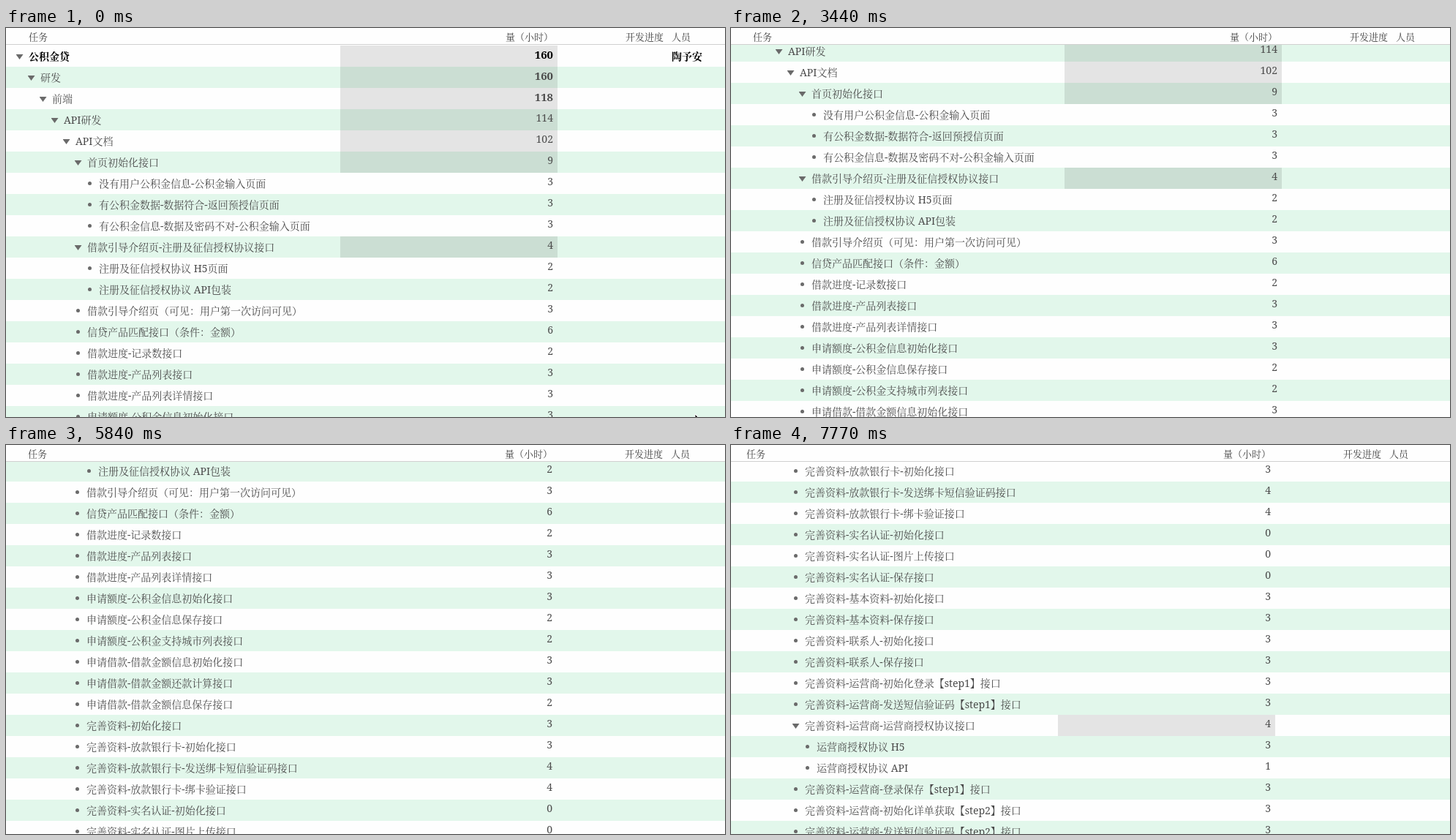
Write an HTML page that moves like this. It is 983 px wide and 532 px high and loops after 8000 ms.

```html
<!DOCTYPE html>
<html lang="zh-CN">
<head>
<meta charset="utf-8">
<title>任务列表</title>
<style>
html, body { margin: 0; width: 100%; height: 100%; overflow: hidden; background: #fefefe; }
body {
  position: relative;
  font: 14px "Noto Serif", "Noto Serif CJK SC", "Noto Sans CJK SC", "Noto Sans CJK", serif;
  color: #4a4a4a;
  white-space: nowrap;
}
.view { position: absolute; left: 0; right: 0; overflow: hidden; }
#head { top: 0; height: 22px; border-bottom: 1px solid #d0d0d0; font-size: 13px; line-height: 24px; color: #404040; }
#body { top: 23px; bottom: 0; }
.pan { position: absolute; inset: 0 -20px 0 0; animation: pan 8s step-end infinite; }
.pan span { position: absolute; top: 0; }
#list { position: absolute; top: 1px; left: 0; right: 0; animation: scroll 8s step-end infinite; }
.row { position: relative; height: 29px; line-height: 29px; }
.row:nth-child(even) { background: #e2f7eb; }
.row .hours { left: 457px; width: 291px; height: 29px; padding-right: 6px; line-height: 24px; text-align: right; }
.group .hours { background: rgba(0, 0, 0, .1); }
.row:nth-child(-n+3) .hours { font-size: 15px; font-weight: bold; }
.row:first-child { color: #000; font-weight: bold; }
.mark { position: absolute; top: 12px; width: 5.4px; height: 5.4px; margin-left: -2.7px; border-radius: 50%; background: #6a6a6a; }
.group .mark { width: 10px; height: 7px; margin-left: -5px; border-radius: 0; clip-path: polygon(0 0, 100% 0, 50% 100%); }
#pointer { position: absolute; left: 0; top: 0; animation: point 8s step-end infinite; }

/* Every swipe advances in equal jumps between its knots. */
@keyframes scroll {
  0% { transform: translateY(0); }
  35.5% { transform: translateY(-11px); animation-timing-function: steps(3); }
  41.125% { transform: translateY(-86px); animation-timing-function: steps(3); }
  46.75% { transform: translateY(-110px); animation-timing-function: steps(2); }
  50.5% { transform: translateY(-114px); }
  54.25% { transform: translateY(-123px); animation-timing-function: steps(2); }
  58% { transform: translateY(-163px); animation-timing-function: steps(4); }
  65.5% { transform: translateY(-223px); }
  67.375% { transform: translateY(-229px); animation-timing-function: steps(3); }
  73% { transform: translateY(-322px); }
  74.75% { transform: translateY(-349px); animation-timing-function: steps(6); }
  86% { transform: translateY(-547px); }
  87.75% { transform: translateY(-579px); animation-timing-function: steps(5); }
  97.125%, 100% { transform: translateY(-699px); }
}
@keyframes pan {
  0%, 50.5%, 80.375% { transform: translateX(0); }
  39.25%, 67.375% { transform: translateX(-1px); }
  91.5% { transform: translateX(-4px); }
  93.375% { transform: translateX(-8px); }
  95.25%, 100% { transform: translateX(-10px); }
}
@keyframes point {
  0% { transform: translate(941px, 527px); visibility: visible; }
  18.75% { transform: translate(967px, 496px); visibility: visible; }
  20.5%, 100% { transform: translate(967px, 496px); visibility: hidden; }
}
</style>
</head>
<body>
<div id="head" class="view"><div class="pan">
  <span style="left:31px">任务</span>
  <span style="left:683px">量（小时）</span>
  <span style="left:847px">开发进度</span>
  <span style="left:910px">人员</span>
</div></div>
<div id="body" class="view"><div class="pan"><div id="list"></div></div></div>
<svg id="pointer" width="13" height="19"><path d="M1 1V15.5L4.3 12.4L6.6 17.8L9 16.8L6.7 11.5H11.2Z" fill="#000" stroke="#fff"/></svg>
<script>
// Each line: depth, task, hours.
const tasks = `0公积金贷 160
1研发 160
2前端 118
3API研发 114
4API文档 102
5首页初始化接口 9
6没有用户公积金信息-公积金输入页面 3
6有公积金数据-数据符合-返回预授信页面 3
6有公积金信息-数据及密码不对-公积金输入页面 3
5借款引导介绍页-注册及征信授权协议接口 4
6注册及征信授权协议 H5页面 2
6注册及征信授权协议 API包装 2
5借款引导介绍页（可见：用户第一次访问可见） 3
5信贷产品匹配接口（条件：金额） 6
5借款进度-记录数接口 2
5借款进度-产品列表接口 3
5借款进度-产品列表详情接口 3
5申请额度-公积金信息初始化接口 3
5申请额度-公积金信息保存接口 2
5申请额度-公积金支持城市列表接口 2
5申请借款-借款金额信息初始化接口 3
5申请借款-借款金额还款计算接口 3
5申请借款-借款金额信息保存接口 2
5完善资料-初始化接口 3
5完善资料-放款银行卡-初始化接口 3
5完善资料-放款银行卡-发送绑卡短信验证码接口 4
5完善资料-放款银行卡-绑卡验证接口 4
5完善资料-实名认证-初始化接口 0
5完善资料-实名认证-图片上传接口 0
5完善资料-实名认证-保存接口 0
5完善资料-基本资料-初始化接口 3
5完善资料-基本资料-保存接口 3
5完善资料-联系人-初始化接口 3
5完善资料-联系人-保存接口 3
5完善资料-运营商-初始化登录【step1】接口 3
5完善资料-运营商-发送短信验证码【step1】接口 3
5完善资料-运营商-运营商授权协议接口 4
6运营商授权协议 H5 3
6运营商授权协议 API 1
5完善资料-运营商-登录保存【step1】接口 3
5完善资料-运营商-初始化详单获取【step2】接口 3
5完善资料-运营商-发送短信验证码【step2】接口 3`
  .split("\n").map(line => line.match(/^(\d)(.+) (\d+)$/).slice(1));

document.getElementById("list").innerHTML = tasks.map(([depth, name, hours], i) => {
  const next = tasks[i + 1];
  const group = next && next[0] > depth ? " group" : "";
  const indent = 16 * depth;
  const owner = i ? "" : '<span style="left:910px">陶予安</span>';
  return `<div class="row${group}"><i class="mark" style="left:${indent + 18.5}px"></i>` +
    `<span style="left:${indent + 31}px">${name}</span>` +
    `<span class="hours">${hours}</span>${owner}</div>`;
}).join("");
</script>
</body>
</html>
```
